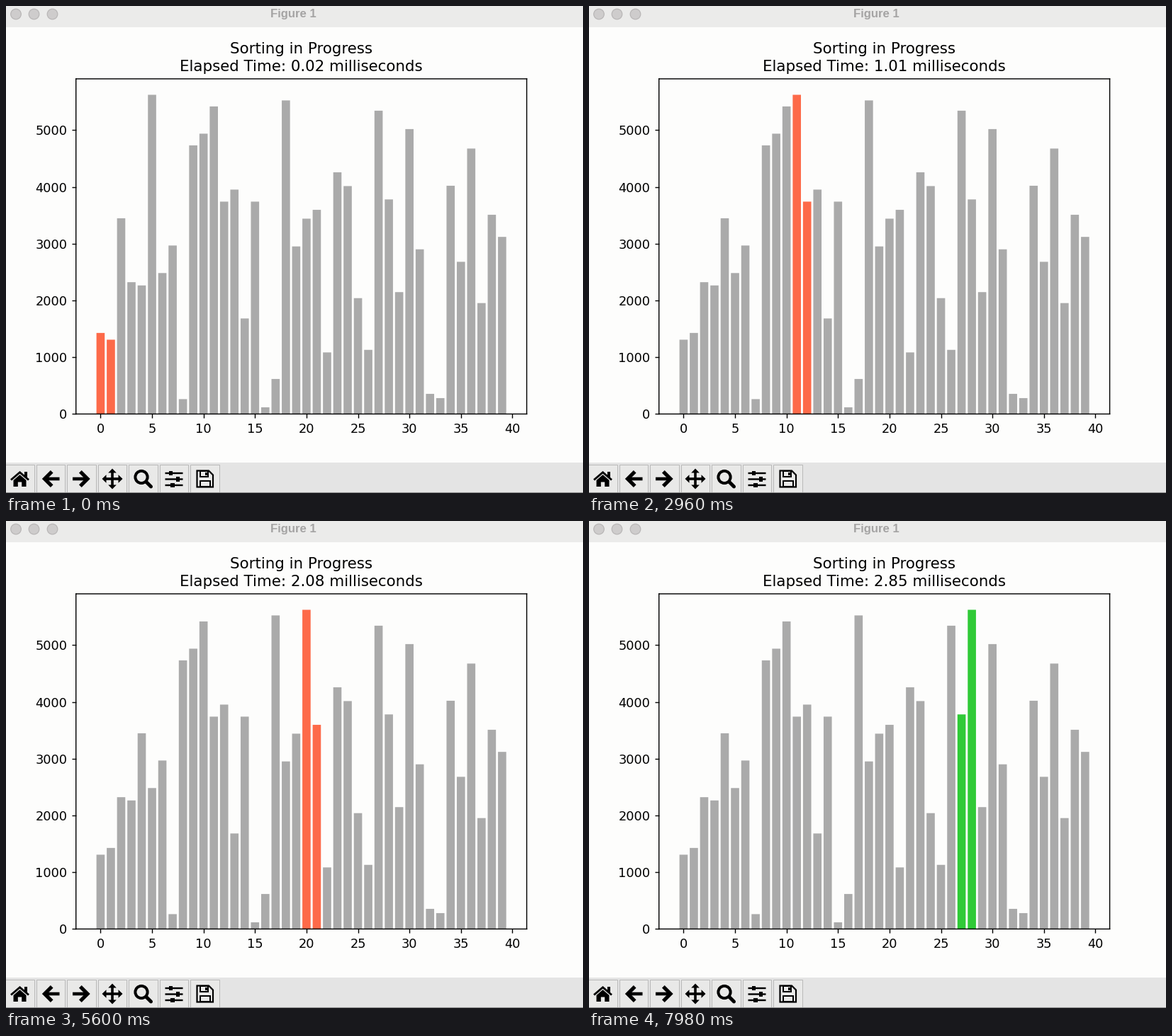
These frames come from a looping animation (814x688 px, 8 s). A matplotlib script:

```python
import matplotlib.pyplot as plt
import numpy as np
from matplotlib.animation import FuncAnimation
from matplotlib.patches import Circle, Polygon, Rectangle

W, H, DPI = 814, 688, 128
STEP = 20            # ms per frame
FRAMES = 400
TICK = 140           # screen refresh, ms
PACE = 155           # one sorting step, ms

PAPER = "#fdfdfc"
GRAY, RED, GREEN = "#aaaaaa", "#fd6a49", "#30ca37"

VALUES = [
    1428, 1309, 3448, 2322, 2265, 5623, 2483, 2968, 262, 4732,
    4938, 5418, 3741, 3953, 1683, 3741, 118, 617, 5524, 2952,
    3441, 3597, 1085, 4258, 4015, 2041, 1130, 5343, 3780, 2147,
    5019, 2901, 355, 280, 4021, 2681, 4676, 1954, 3510, 3120,
]

plt.rcParams["font.family"] = "DejaVu Sans"
fig = plt.figure(figsize=(W / DPI, H / DPI), dpi=DPI, facecolor=PAPER)


def px(width):
    """Line width in points for a width in pixels."""
    return width * 72 / DPI


# ---- window frame and toolbar, in pixel coordinates ----
win = fig.add_axes([0, 0, 1, 1])
win.set_xlim(0, W)
win.set_ylim(H, 0)
win.axis("off")


def rect(x0, y0, x1, y1, fill="black", edge="none", lw=0):
    win.add_patch(Rectangle((x0, y0), x1 - x0, y1 - y0, facecolor=fill,
                            edgecolor=edge, linewidth=px(lw)))


def poly(points, fill="black", edge="none", lw=0):
    win.add_patch(Polygon(points, closed=True, facecolor=fill,
                          edgecolor=edge, linewidth=px(lw)))


def stroke(points, lw, cap="butt"):
    xs, ys = zip(*points)
    win.plot(xs, ys, color="black", linewidth=px(lw), snap=False,
             solid_capstyle=cap, solid_joinstyle="miter")


def home(x, y):
    stroke([(x - 12.5, y + 1.5), (x, y - 9.2), (x + 12.5, y + 1.5)], 2.8)
    rect(x + 6.5, y - 10.5, x + 10, y - 2)
    poly([(x - 9, y + 2), (x, y - 5.8), (x + 9, y + 2), (x + 9, y + 11),
          (x + 2.7, y + 11), (x + 2.7, y + 4.5), (x - 2.7, y + 4.5),
          (x - 2.7, y + 11), (x - 9, y + 11)])


def arrow(x, y, way):
    stroke([(x - way * 1.2, y - 10.2), (x + way * 9, y),
            (x - way * 1.2, y + 10.2)], 5.2)
    stroke([(x - way * 12, y), (x + way * 9, y)], 4.6)


def move(x, y):
    stroke([(x - 10, y), (x + 10, y)], 3.6)
    stroke([(x, y - 10), (x, y + 10)], 3.6)
    for dx, dy in [(1, 0), (-1, 0), (0, 1), (0, -1)]:
        bx, by = x + 8.5 * dx, y + 8.5 * dy
        poly([(x + 14.5 * dx, y + 14.5 * dy),
              (bx + 5.8 * dy, by + 5.8 * dx),
              (bx - 5.8 * dy, by - 5.8 * dx)])


def lens(x, y):
    win.add_patch(Circle((x - 2.5, y - 2.5), 8.6, fill=False,
                         edgecolor="black", linewidth=px(4)))
    stroke([(x + 4.5, y + 4.5), (x + 11, y + 11)], 5, "round")


def sliders(x, y):
    for dy, knob in [(-8, -4.5), (0.5, 5.5), (9, -2)]:
        stroke([(x - 12.5, y + dy), (x + 12.5, y + dy)], 2.4)
        rect(x + knob - 2.6, y + dy - 3.4, x + knob + 2.6, y + dy + 3.4)


def disk(x, y):
    poly([(x - 11, y - 11.5), (x + 5.5, y - 11.5), (x + 11.5, y - 5.5),
          (x + 11.5, y + 11.5), (x - 11, y + 11.5)], "none", "black", 2.2)
    poly([(x - 6.5, y - 11), (x + 4.5, y - 11), (x + 4.5, y - 3.5),
          (x - 6.5, y - 3.5)], "none", "black", 2)
    rect(x, y - 9.5, x + 3, y - 5)
    poly([(x - 6.5, y + 3), (x + 7, y + 3), (x + 7, y + 11),
          (x - 6.5, y + 11)], "none", "black", 2)


rect(0, 0, W, 30, "#ebebea")
for cx in (14, 39.5, 65.5):
    win.add_patch(Circle((cx, 11.5), 7.3, facecolor="#cecccc",
                         edgecolor="#b8b6b6", linewidth=px(1.2)))
win.text(405.5, 16.4, "Figure 1", family="Liberation Sans", weight="bold",
         size=px(16.8), color="#a5a4a4", ha="center", va="baseline")

rect(0, 644.5, W, H, "#e4e4e4")
for i in range(7):
    left = 43.5 * i - 1.5
    rect(left + 0.5, 647.5, left + 41, 687, "#e9e9e8", "#b9b9b9", 1)
rect(0, 687, W, H, "#8c8c8c")

CY = 668
home(19.5, CY)
arrow(63.5, CY, -1)
arrow(106, CY, 1)
move(150, CY)
lens(193.5, CY)
sliders(237, CY)
disk(280.5, CY)

# ---- chart ----
L, R, T, B = 98.7, 734.6, 102.9, 576.4
ax = fig.add_axes([L / W, 1 - B / H, (R - L) / W, (B - T) / H],
                  facecolor=PAPER)
bars = ax.bar(range(len(VALUES)), VALUES, color=GRAY, snap=False)
ax.set_xlim(-2.39, 41.39)
ax.set_ylim(0, max(VALUES) * 1.05)
ax.set_xticks(range(0, 41, 5))
ax.set_yticks(range(0, 5001, 1000))
for line in [*ax.spines.values(), *ax.get_xticklines(), *ax.get_yticklines()]:
    line.set_snap(False)
title = ax.set_title("", linespacing=1.31)


def bubble(data):
    """Yield (values, left index, colour) for each shown step of one pass."""
    a = list(data)
    for j in range(len(a) - 1):
        if a[j] > a[j + 1]:
            yield list(a), j, RED
            a[j], a[j + 1] = a[j + 1], a[j]
            yield list(a), j, GREEN


STEPS = list(bubble(VALUES))
CLOCK_AT = [0, 8, 15, 23, 36, 45, 51]
CLOCK = [0.02, 0.51, 0.84, 1.29, 2.08, 2.53, 2.85]


def step_at(ms):
    refreshed = (ms + 20) // TICK * TICK - 20
    return max(0, (refreshed + 5) // PACE)


def update(frame):
    k = step_at(frame * STEP)
    values, j, color = STEPS[k]
    for i, (bar, v) in enumerate(zip(bars, values)):
        bar.set_height(v)
        bar.set_facecolor(color if i in (j, j + 1) else GRAY)
    elapsed = np.interp(k, CLOCK_AT, CLOCK)
    title.set_text("Sorting in Progress\n"
                   f"Elapsed Time: {elapsed:.2f} milliseconds")
    return [*bars, title]


anim = FuncAnimation(fig, update, frames=FRAMES, interval=STEP,
                     init_func=lambda: update(0), repeat=True,
                     repeat_delay=0, blit=False)
plt.show()
```
